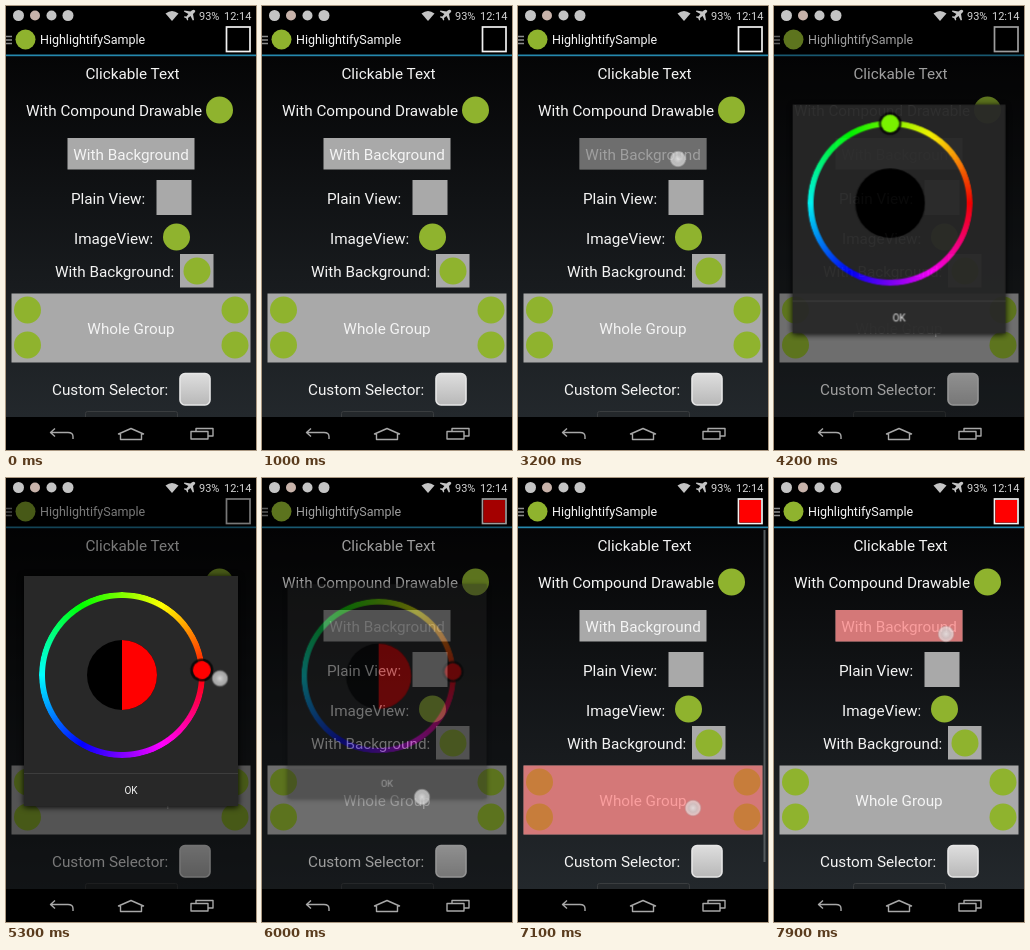
These frames come from a looping animation (250 px wide and 444 px high, 8000 ms). An HTML page:

```html
<!DOCTYPE html>
<html lang="en">
<head>
<meta charset="utf-8">
<title>Highlight sample</title>
<style>
html, body { margin: 0; width: 100%; height: 100%; overflow: hidden; background: #000; }
#stage { position: relative; width: 250px; height: 444px; overflow: hidden; }
svg, .scrim, .dialog, .wheel { position: absolute; left: 0; top: 0; }
svg { width: 250px; height: 444px; }
text { font-family: Roboto, "Open Sans", sans-serif; font-size: 15.25px; fill: #f4f4f4; }
.mid { text-anchor: middle; }
.status { font-size: 11px; fill: #d4d4d4; }
.title { font-size: 12.5px; }
.ok { font-size: 10px; }
.bot { fill: #8fb32e; }
.box { fill: #a9a9a9; }
.line { fill: none; stroke: #a8a8a8; stroke-width: 1.4; stroke-linejoin: round; }

.scrim { top: 19px; width: 250px; height: 392px; background: #000; }
.dialog { width: 250px; height: 444px; transform-origin: 125px 213px; }
.panel { fill: #282828; filter: drop-shadow(0 1px 3px #000); }
.wheel {
  left: 33px; top: 114px; width: 166px; height: 166px; border-radius: 50%;
  background: conic-gradient(from 90deg, #f00, #f0f, #00f, #0ff, #0f0, #ff0, #f00);
  -webkit-mask: radial-gradient(closest-side, transparent 76.5px, #000 77.5px);
  mask: radial-gradient(closest-side, transparent 76.5px, #000 77.5px);
}
.hue { fill: #80ff00; }

/* 1% of the loop is 80 ms */
.scrim, .dialog, .hue, .half, .knob, .drag, .tap, .picked, .press, .bar { animation: 8s linear infinite; }
.scrim { animation-name: scrim; }
.dialog { animation-name: dialog; }
.hue { animation-name: hue; }
.knob { animation-name: knob; }
.drag { animation-name: drag; }
.bar { animation-name: bar; }
.half, .tap, .picked, .press { animation-timing-function: step-end; }
.half { animation-name: half; }
.tap { animation-name: tap; }
.picked { animation-name: picked; }
.group.dark { animation-name: group-dark; }
.button.dark { animation-name: button-dark; }
.group.red { animation-name: group-red; }
.button.red { animation-name: button-red; }
.dark { fill: rgba(0, 0, 0, .35); }
.red { fill: rgba(255, 72, 72, .5); }

@keyframes scrim {
  0%, 49.4% { opacity: 0; }
  53.8%, 73.5% { opacity: .5; }
  78.8%, 100% { opacity: 0; }
}
@keyframes dialog {
  0%, 49.4% { opacity: 0; transform: scale(.9); animation-timing-function: ease-out; }
  53.2%, 73.5% { opacity: 1; transform: none; }
  75.9%, 100% { opacity: 0; transform: scale(.89); }
}
@keyframes hue {
  0%, 56.25% { fill: #80ff00; }
  59.37% { fill: #ff0; }
  65.6%, 100% { fill: #f00; }
}
@keyframes knob {
  0%, 56.25% { transform: rotate(0deg); }
  65.6%, 100% { transform: rotate(86.5deg); }
}
@keyframes drag {
  0%, 56.2% { opacity: 0; transform: rotate(0deg) translateY(-82px); }
  56.25% { opacity: 1; transform: rotate(0deg) translateY(-82px); }
  65.6%, 67.5% { opacity: 1; transform: rotate(92deg) translateY(-98px); }
  67.55%, 100% { opacity: 0; transform: rotate(92deg) translateY(-98px); }
}
@keyframes bar { 0%, 87% { opacity: 0; } 87.5%, 90% { opacity: 1; } 94%, 100% { opacity: 0; } }
@keyframes half { 0% { opacity: 0; } 56.25%, 100% { opacity: 1; } }
@keyframes picked { 0% { opacity: 0; } 73.5%, 100% { opacity: 1; } }
@keyframes tap {
  0% { opacity: 0; }
  21.25% { opacity: 1; transform: translate(153px, 334px); }
  30% { opacity: 0; }
  34.4% { opacity: 1; transform: translate(160px, 153px); }
  41.2% { opacity: 0; }
  45% { opacity: 1; transform: translate(232px, 35px); }
  48.1% { opacity: 0; }
  71.2% { opacity: 1; transform: translate(160px, 319px); }
  76.2% { opacity: 0; }
  85% { opacity: 1; transform: translate(175px, 330px); }
  91.8% { opacity: 0; }
  95.6%, 100% { opacity: 1; transform: translate(172px, 156px); }
}
@keyframes group-dark { 0% { opacity: 0; } 21.25% { opacity: 1; } 30%, 100% { opacity: 0; } }
@keyframes button-dark { 0% { opacity: 0; } 34.4% { opacity: 1; } 41.2%, 100% { opacity: 0; } }
@keyframes group-red { 0% { opacity: 0; } 85% { opacity: 1; } 91.8%, 100% { opacity: 0; } }
@keyframes button-red { 0% { opacity: 0; } 95.6%, 100% { opacity: 1; } }
</style>
</head>
<body>
<div id="stage">
  <svg viewBox="0 0 250 444">
    <defs>
      <linearGradient id="page" x2="0" y2="1">
        <stop stop-color="#050506"/><stop offset="1" stop-color="#23282c"/>
      </linearGradient>
      <linearGradient id="key" x2="0" y2="1">
        <stop stop-color="#dedede"/><stop offset="1" stop-color="#b8b8b8"/>
      </linearGradient>
      <radialGradient id="touch">
        <stop stop-color="#e4e4e4" stop-opacity=".9"/>
        <stop offset=".5" stop-color="#cfcfcf" stop-opacity=".8"/>
        <stop offset=".8" stop-color="#e8e8e8" stop-opacity=".65"/>
        <stop offset="1" stop-color="#aaa" stop-opacity=".2"/>
      </radialGradient>
      <circle id="bot" class="bot" r="13.5"/>
    </defs>
    <rect width="250" height="444"/>
    <rect y="50" width="250" height="361" fill="url(#page)"/>
    <rect y="48.5" width="250" height="1.7" fill="#2588ad"/>

    <!-- status bar -->
    <g fill="#c4c4c4">
      <circle cx="12.5" cy="9.5" r="5.5"/>
      <circle cx="29" cy="9.5" r="5" fill="#c8b3aa"/>
      <circle cx="45.5" cy="9.5" r="5"/>
      <circle cx="62" cy="9.5" r="5.5"/>
      <path d="M159.5 7.5Q166 2.5 172.5 7.5L166 15Z"/>
      <path d="M189 4.5q1 1-2 3.5l1 6-1.2.5-2.3-4.5-2.5 2 .2 2-1 .5-1-2.3-2.3-1 .5-1 2 .2 2-2.5-4.5-2.3.5-1.2 6 1q3-2.8 4.6-1Z"/>
    </g>
    <text class="status" x="193" y="13.5">93%</text>
    <text class="status" x="218" y="13.5">12:14</text>

    <!-- action bar -->
    <path d="M0 30.5h6M0 34h6M0 37.5h6" stroke="#8c8c8c" stroke-width="1.5"/>
    <circle class="bot" cx="19.5" cy="33.5" r="10"/>
    <text class="title" x="34" y="38">HighlightifySample</text>
    <rect x="220.5" y="21" width="23.5" height="24.5" stroke="#f2f2f2" stroke-width="1.7"/>
    <rect class="picked" x="221.5" y="22" width="21.5" height="22.5" fill="#f00"/>

    <!-- content -->
    <text class="mid" x="126.5" y="72.5">Clickable Text</text>
    <text x="20" y="109.7">With Compound Drawable</text>
    <use href="#bot" x="213.5" y="104"/>
    <rect class="box" x="61.5" y="132" width="127" height="31.5"/>
    <text class="mid" x="125" y="153.5">With Background</text>
    <text x="65" y="197.7">Plain View:</text>
    <rect class="box" x="150.5" y="174" width="35" height="35"/>
    <text x="68" y="237.7">ImageView:</text>
    <use href="#bot" x="170.5" y="231"/>
    <text x="49" y="270.7">With Background:</text>
    <rect class="box" x="174" y="248" width="33.5" height="33.5"/>
    <use href="#bot" x="191" y="265"/>
    <rect class="box" x="5.5" y="287.5" width="239" height="69"/>
    <use href="#bot" x="21.5" y="304"/>
    <use href="#bot" x="21.5" y="339"/>
    <use href="#bot" x="229" y="304"/>
    <use href="#bot" x="229" y="339"/>
    <text class="mid" x="125" y="327.7">Whole Group</text>
    <text x="46" y="388.7">Custom Selector:</text>
    <rect x="174" y="367.5" width="30" height="31.5" rx="5" fill="url(#key)" stroke="#e6e6e6" stroke-width="1.6"/>
    <path d="M79.5 411v-3.5q0-2 2-2h88q2 0 2 2v3.5" fill="#24282b" stroke="#3a3d3f"/>
    <rect class="bar" x="245.5" y="52" width="2" height="332" fill="#555a5d"/>

    <rect class="press group dark" x="5.5" y="287.5" width="239" height="69"/>
    <rect class="press group red" x="5.5" y="287.5" width="239" height="69"/>
    <rect class="press button dark" x="61.5" y="132" width="127" height="31.5"/>
    <rect class="press button red" x="61.5" y="132" width="127" height="31.5"/>

    <!-- navigation bar -->
    <rect y="411" width="250" height="33"/>
    <g class="line">
      <path d="M49 422.5l-4.5 4 4.5 4M45 426.500h17q5 0 5 4v2.500"/>
      <path d="M112.500 428l12.500-5.500 12.500 5.500h-2v5.500h-21v-5.500Z"/>
      <path d="M185 425.500h17v7.500h-17ZM190 425.500v-3h17v7.500h-5"/>
    </g>
  </svg>

  <div class="scrim"></div>
  <div class="dialog">
    <svg viewBox="0 0 250 444">
      <rect class="panel" x="18" y="98" width="214" height="230"/>
      <path d="M18 295.5h214" stroke="#3d3d3d"/>
      <text class="ok mid" x="125" y="316">OK</text>
    </svg>
    <div class="wheel"></div>
    <svg viewBox="0 0 250 444">
      <g transform="translate(116 197)">
        <circle r="35"/>
        <g class="half"><path class="hue" d="M0-35a35 35 0 0 1 0 70Z"/></g>
        <g class="knob">
          <circle cy="-80" r="11.5" fill="#000" fill-opacity=".75"/>
          <circle class="hue" cy="-80" r="9"/>
        </g>
      </g>
    </svg>
  </div>

  <svg viewBox="0 0 250 444">
    <g transform="translate(116 197)"><circle class="drag" r="8.5" fill="url(#touch)"/></g>
    <circle class="tap" r="8.5" fill="url(#touch)"/>
  </svg>
</div>
</body>
</html>
```
